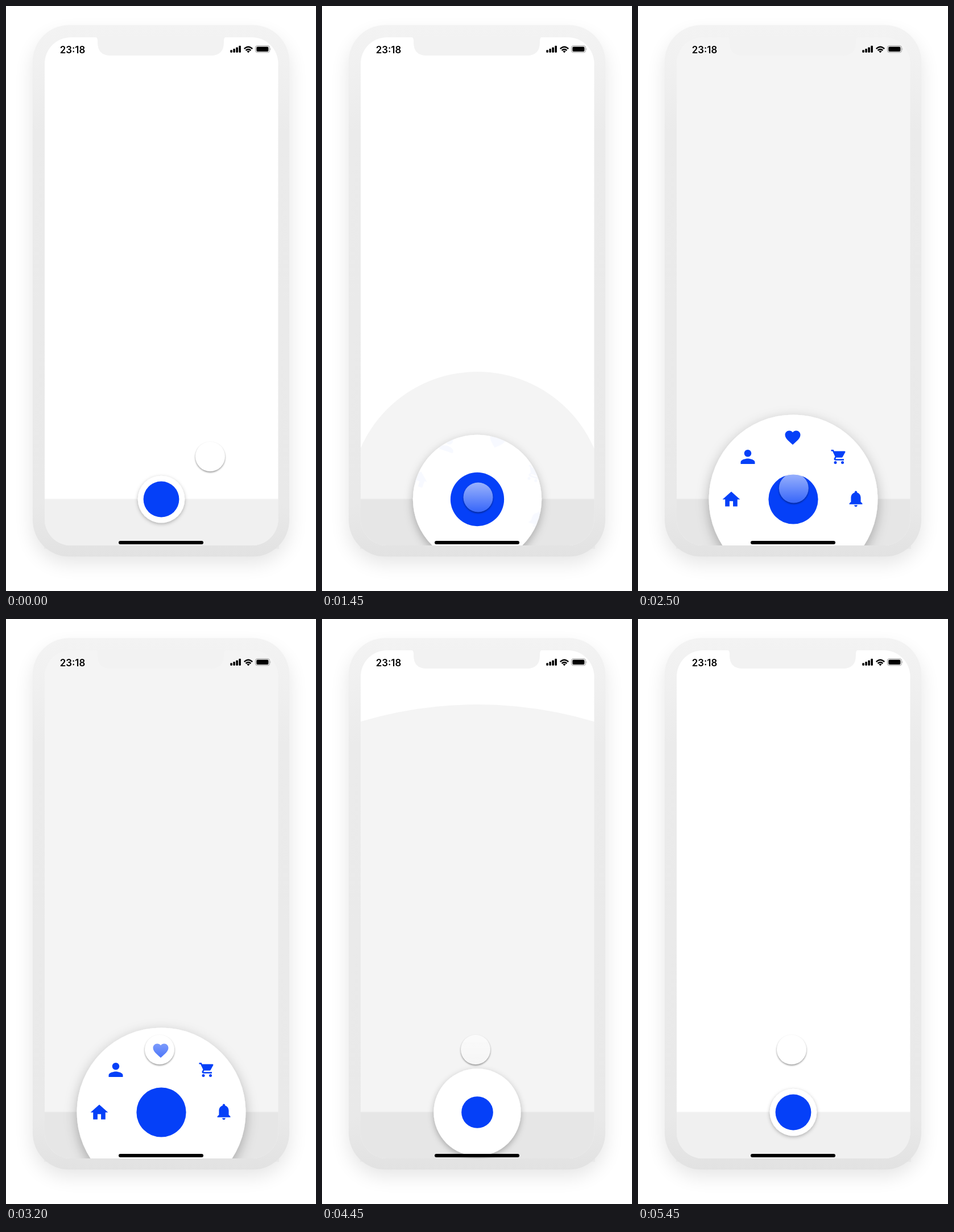
Recreate the animation shown at these times as an HTML page. Size 545 px wide and 1027 px high, loop 5500 ms.

```html
<!DOCTYPE html>
<html lang="en">
<head>
<meta charset="utf-8">
<title>Radial menu</title>
<style>
  html, body { margin: 0; width: 100%; height: 100%; overflow: hidden; background: #fff; }
  svg { display: block; width: 100vw; height: 100vh; }
  .time { font: 600 16.8px Inter, Roboto, sans-serif; }
</style>
</head>
<body>
<svg viewBox="0 0 545 1027">
  <defs>
    <linearGradient id="bezel" x1="0" y1="0" x2="0" y2="1">
      <stop offset="0" stop-color="#f3f3f3"/>
      <stop offset=".06" stop-color="#f1f1f1"/>
      <stop offset=".2" stop-color="#ebebeb"/>
      <stop offset=".9" stop-color="#e9e9e9"/>
      <stop offset="1" stop-color="#e2e2e2"/>
    </linearGradient>
    <linearGradient id="glass" x1="0" y1="0" x2="0" y2="1">
      <stop offset="0" stop-color="#fff" stop-opacity=".6"/>
      <stop offset="1" stop-color="#fff" stop-opacity=".2"/>
    </linearGradient>
    <filter id="phoneShadow" x="-20%" y="-20%" width="140%" height="140%">
      <feGaussianBlur stdDeviation="17"/>
    </filter>
    <filter id="discShadow" x="-50%" y="-50%" width="200%" height="200%">
      <feDropShadow dx="0" dy="2" stdDeviation="3" flood-color="#000" flood-opacity=".28"/>
    </filter>
    <filter id="soft" x="-50%" y="-50%" width="200%" height="200%">
      <feGaussianBlur stdDeviation="1.6"/>
    </filter>
    <mask id="outside" maskUnits="userSpaceOnUse" x="-45" y="-45" width="90" height="90">
      <rect x="-45" y="-45" width="90" height="90" fill="#fff"/>
      <circle r="26" fill="#000"/>
    </mask>
    <clipPath id="screen"><rect x="68" y="55" width="410.5" height="892" rx="46"/></clipPath>
    <clipPath id="discClip"><circle id="discEdge" cx="273" cy="866"/></clipPath>
  </defs>

  <rect width="545" height="1027" fill="#fff"/>
  <rect x="47" y="50" width="451" height="928" rx="63" opacity=".1" filter="url(#phoneShadow)"/>
  <path d="M67 900H480V953H67z" fill="#e9e9e9"/>
  <rect x="47" y="33.5" width="451" height="933" rx="64" fill="url(#bezel)"/>

  <g clip-path="url(#screen)">
    <rect x="68" y="55" width="411" height="892" fill="#fff"/>
    <rect x="60" y="866" width="427" height="90" fill="#ddd" opacity=".5" filter="url(#soft)"/>
    <rect x="68" y="866" width="411" height="82" fill="#f0f0f0"/>
    <circle id="veil" cx="273" cy="866" fill-opacity=".044"/>
    <g id="disc"><circle r="41.3" fill="#fff" filter="url(#discShadow)"/></g>
    <g clip-path="url(#discClip)"><g id="icons" fill="#0540f8"></g></g>
    <circle id="core" cx="273" cy="866" fill="#0540f8"/>
  </g>

  <path d="M157 54.5Q161 55 161 61V64Q161 87 184 87H360Q383 87 383 64V61Q383 55 387 54.5z" fill="#f2f2f2"/>
  <rect x="198" y="939" width="149" height="6" rx="3"/>

  <text class="time" x="94.8" y="83">23:18</text>
  <g id="bars"></g>
  <g fill="none" stroke="#000" stroke-width="2.4">
    <path d="M418.8 75.2Q426 68.2 433.2 75.2"/>
    <path d="M421.6 78Q426 74 430.4 78"/>
  </g>
  <path d="M423.4 79.6Q426 77.6 428.6 79.6L426 82.2z"/>
  <rect x="438.5" y="69.8" width="25" height="11.8" rx="3.4" fill="none" stroke="#999"/>
  <rect x="440.3" y="71.5" width="21.2" height="8.4" rx="1.9"/>
  <path d="M464.6 73.8Q466.2 75.7 464.6 77.6z" fill="#999"/>

  <g id="pointer">
    <circle cy="1.7" r="26" opacity=".42" filter="url(#soft)" mask="url(#outside)"/>
    <circle r="26" fill="url(#glass)"/>
  </g>
</svg>
<script>
const LOOP = 5500, STEP = 50, OPEN = 1300, CLOSE = 4300, CX = 273, CY = 866;
const NS = 'http://www.w3.org/2000/svg';
const $ = id => document.getElementById(id);
const set = (el, attrs) => { for (const k in attrs) el.setAttribute(k, attrs[k]); return el; };
const add = (parent, tag, attrs) => parent.appendChild(set(document.createElementNS(NS, tag), attrs));

const clamp = x => Math.min(1, Math.max(0, x));
const lerp = (a, b, k) => a + (b - a) * k;
const sine = x => 0.5 - 0.5 * Math.cos(Math.PI * clamp(x));
const decay = ms => ms <= 0 ? 0 : 1 - Math.exp(-ms * 0.0074);
const back = x => {
  const s = 4.16, u = clamp(x) - 1;
  return 1 + (s + 1) * u ** 3 + s * u ** 2;
};

// place on the ring, scale, centre of the path in its 24-unit grid
const icons = [
  { x: 164, y: 865.5, s: 1.54, cx: 12, cy: 11.5, d: 'M10 20v-6h4v6h5v-8h3L12 3 2 12h3v8z' },
  { x: 193, y: 791.5, s: 1.56, cx: 12, cy: 12, d: 'M12 12c2.21 0 4-1.79 4-4s-1.79-4-4-4-4 1.79-4 4 1.79 4 4 4zm0 2c-2.67 0-8 1.34-8 4v2h16v-2c0-2.66-5.33-4-8-4z' },
  { x: 272, y: 758, s: 1.35, cx: 12, cy: 12.2, d: 'M12 21.35l-1.45-1.32C5.4 15.36 2 12.28 2 8.5 2 5.42 4.42 3 7.5 3c1.74 0 3.41.81 4.5 2.09C13.09 3.81 14.76 3 16.5 3 19.58 3 22 5.42 22 8.5c0 3.78-3.4 6.86-8.55 11.54z' },
  { x: 352, y: 791.5, s: 1.25, cx: 11, cy: 12, d: 'M7 18a2 2 0 1 0 0 4 2 2 0 0 0 0-4zM1 2v2h2l3.6 7.59-1.35 2.45C4.5 15.4 5.5 17 7 17h12v-2H7.42c-.14 0-.25-.11-.25-.25l.93-1.75h7.45c.75 0 1.41-.41 1.75-1.03l3.58-6.49C21.2 4.8 20.7 4 20 4H5.21l-.94-2zm16 16a2 2 0 1 0 0 4 2 2 0 0 0 0-4z' },
  { x: 383, y: 865, s: 1.43, cx: 12, cy: 12.2, d: 'M12 22c1.1 0 2-.9 2-2h-4c0 1.1.89 2 2 2zm6-6v-5c0-3.07-1.64-5.64-4.5-6.32V4c0-.83-.67-1.5-1.5-1.5s-1.5.67-1.5 1.5v.68C7.63 5.36 6 7.92 6 11v5l-2 2v1h16v-1z' }
];

function placeIcon(icon, zoom = 1) {
  const { x, y, s, cx, cy } = icon;
  set(icon.el, { transform: `translate(${x} ${y}) scale(${s * zoom}) translate(${-cx} ${-cy})` });
}
for (const icon of icons) {
  icon.el = add($('icons'), 'path', { d: icon.d });
  placeIcon(icon);
}
[4.6, 6.8, 9.4, 12].forEach((h, i) =>
  add($('bars'), 'rect', { x: 394.3 + i * 5, y: 81.8 - h, width: 3.6, height: h, rx: 1 }));

function draw(t) {
  const closing = t >= CLOSE;
  const ms = t - (closing ? CLOSE : OPEN);
  const between = (shut, open, k) => closing ? lerp(open, shut, k) : lerp(shut, open, k);

  const discR = between(41.3, 148.5, decay(ms));
  set($('disc'), { transform: `translate(${CX} ${CY}) scale(${discR / 41.3})` });
  set($('discEdge'), { r: discR });
  set($('veil'), { r: between(40, 900, sine(ms / 490)) });
  set($('core'), { r: between(31.4, 43.6, ms <= 0 ? 0 : back(ms / 480)) });

  const fade = closing ? 1 - clamp(ms / 150) : clamp((ms - 140) / 260);
  const turn = between(58, 0, decay(ms));
  set($('icons'), { opacity: fade, transform: `rotate(${turn} ${CX} ${CY})` });
  placeIcon(icons[2], 1 + 0.19 * sine((t - 3700) / 250));

  const toCore = sine((t - 100) / 630), toHeart = sine((t - 2343) / 620);
  const x = lerp(lerp(359, 274.5, toCore), 270, toHeart);
  const y = lerp(lerp(791, 862.5, toCore), 756, toHeart);
  set($('pointer'), { transform: `translate(${x} ${y})` });
}

const start = performance.now();
function tick() {
  const t = (performance.now() - start) % LOOP;
  draw(Math.floor(t / STEP) * STEP);
  requestAnimationFrame(tick);
}
tick();
</script>
</body>
</html>
```
